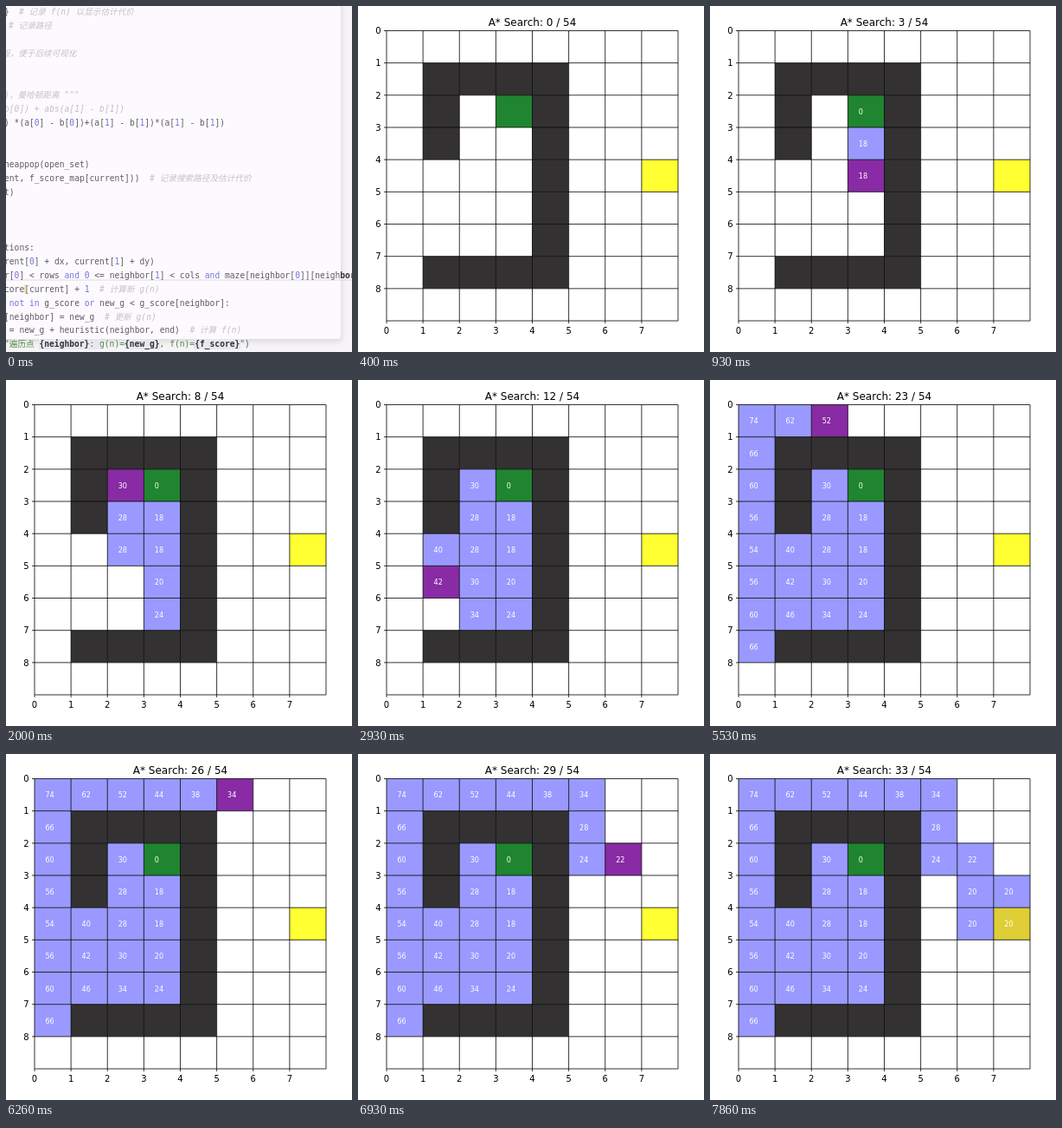
These frames come from a looping animation (400 px wide and 399 px high, 8000 ms). An HTML page:

```html
<!DOCTYPE html>
<html lang="en">
<head>
<meta charset="utf-8">
<title>A* Search</title>
<style>
  html, body { margin: 0; width: 100%; height: 100%; overflow: hidden; background: #fff; }
  svg { display: block; width: 400px; height: 399px; }
  text { white-space: pre; }
  #plot text { font-family: "DejaVu Sans", sans-serif; font-size: 10px; }
  #plot .title { font-size: 12px; text-anchor: middle; }
  #plot .cost { font-size: 8.1px; fill: #fff; }
  #code text { font: 9.63px "DejaVu Sans Mono", "Noto Sans CJK SC", "Noto Sans CJK", monospace; fill: #5d5a60; }
  #code .c { fill: #c3c0c5; font-style: italic; }
  #code .k { fill: #7474da; }
  #code .s { fill: #4d8a45; }
  #code .v { fill: #333; font-weight: bold; }
</style>
</head>
<body>
<svg viewBox="0 0 400 399">
  <g id="plot">
    <rect width="400" height="399" fill="#fff"/>
    <g id="cells"></g>
    <path id="grid" fill="none" stroke="#000" stroke-width=".8"/>
    <g id="labels"></g>
    <text id="title" class="title" x="201.5" y="22.5"></text>
  </g>
  <g id="code">
    <defs>
      <filter id="soft" x="-10%" y="-10%" width="120%" height="120%"><feGaussianBlur stdDeviation="3"/></filter>
    </defs>
    <rect width="400" height="399" fill="#f6f4f7"/>
    <rect x="-10" y="-10" width="398" height="397" rx="4" fill="#c9c5cc" opacity=".6" filter="url(#soft)"/>
    <rect x="-10" y="-10" width="397" height="394" rx="4" fill="#fdfaff"/>
    <path d="M0 316H400" stroke="#dedbe0"/>
    <path d="M38 384H108V396H38ZM137 384H178V396H137ZM217 384H271V396H217Z" fill="#e9e6f2"/>
    <path d="M22 321V332" stroke="#efe9a8" stroke-width="2"/>
  </g>
</svg>
<script>
const $ = id => document.getElementById(id);
const LOOP = 8000, FPS = 15;
const COLS = 8, ROWS = 9, X0 = 33, Y0 = 28.5, W = 42.125, H = 37.17;

function add(parent, tag, attrs, text = "") {
  const el = document.createElementNS("http://www.w3.org/2000/svg", tag);
  for (const k in attrs) el.setAttribute(k, attrs[k]);
  el.textContent = text;
  parent.append(el);
  return el;
}

// Code listing: [row, x, text]; styled runs are written «class:text»
const listing = [
  [0, -2, "}"], [0, 15, "«c:# 记录 f(n) 以显示估计代价»"],
  [1, 3, "«c:# 记录路径»"],
  [3, -5, "«c:程，便于后续可视化»"],
  [6, -2, "«c:)，曼哈顿距离 \"\"\"»"],
  [7, -2, "«c:b[0]) + abs(a[1] - b[1])»"],
  [8, -2, ") *(a[«k:0»] - b[«k:0»])+(a[«k:1»] - b[«k:1»])*(a[«k:1»] - b[«k:1»])"],
  [11, -2, "heappop(open_set)"],
  [12, -2, "ent, f_score_map[current]))  «c:# 记录搜索路径及估计代价»"],
  [13, -2, "t)"],
  [17, -2, "tions:"],
  [18, -2, "rent[«k:0»] + dx, current[«k:1»] + dy)"],
  [19, -2, "r[«k:0»] < rows «k:and» «k:0» <= neighbor[«k:1»] < cols «k:and» maze[neighbor[«k:0»]][neigh«v:bor»"],
  [20, -2, "core[current] + «k:1»  «c:# 计算新 g(n)»"],
  [21, -2, " «k:not in» g_score «k:or» new_g < g_score[neighbor]:"],
  [22, -2, "[neighbor] = new_g  «c:# 更新 g(n)»"],
  [23, -2, " = new_g + heuristic(neighbor, end)  «c:# 计算 f(n)»"],
  [24, -2, "«s:\"遍历点 »«v:{neighbor}»«s:: g(n)=»«v:{new_g}»«s:, f(n)=»«v:{f_score}»«s:\"»)"],
];
for (const [row, x, src] of listing) {
  const line = add($("code"), "text", { x, y: 10.4 + row * 15.96 });
  for (const part of src.split(/[«»]/)) {
    const m = /^([ckvs]):([^]*)$/.exec(part);
    if (part) add(line, "tspan", { class: m ? m[1] : "" }, m ? m[2] : part);
  }
}

// Maze and search; nodes are numbered row * COLS + col
const maze = ["........", ".####...", ".#..#...", ".#..#...", "....#...",
              "....#...", "....#...", ".####...", "........"];
const START = 2 * COLS + 3, END = 4 * COLS + 7;

function search() {
  const g = { [START]: 0 }, f = { [START]: 0 }, open = [START], order = [];
  while (open.length) {
    open.sort((a, b) => f[a] - f[b] || a - b);
    const cur = open.shift(), r = Math.floor(cur / COLS), c = cur % COLS;
    order.push({ id: cur, cost: f[cur] });
    if (cur === END) break;
    for (const [dr, dc] of [[-1, 0], [1, 0], [0, -1], [0, 1]]) {
      const nr = r + dr, nc = c + dc, n = nr * COLS + nc;
      if (maze[nr]?.[nc] !== "." || g[cur] + 1 >= (g[n] ?? Infinity)) continue;
      g[n] = g[cur] + 1;
      f[n] = g[n] + (nr - 4) ** 2 + (nc - 7) ** 2;
      if (!open.includes(n)) open.push(n);
    }
  }
  return order;
}

const px = c => X0 + c * W, py = r => Y0 + r * H;
const cells = [];
for (let r = 0; r < ROWS; r++) for (let c = 0; c < COLS; c++)
  cells.push(add($("cells"), "rect", { x: px(c), y: py(r), width: W, height: H }));

let grid = "";
for (let c = 0; c <= COLS; c++) {
  const x = px(c);
  grid += `M${x} ${Y0}V${py(ROWS) + (c < COLS ? 3 : 0)}`;
  if (c < COLS) add($("labels"), "text", { x, y: 378, "text-anchor": "middle" }, c);
}
for (let r = 0; r <= ROWS; r++) {
  const y = py(r);
  grid += `M${X0 - (r < ROWS ? 3 : 0)} ${y}H${px(COLS)}`;
  if (r < ROWS) add($("labels"), "text", { x: 26.7, y: y + 3.7, "text-anchor": "end" }, r);
}
$("grid").setAttribute("d", grid);

const visits = search();
for (const v of visits) {
  const r = Math.floor(v.id / COLS), c = v.id % COLS;
  v.label = add($("labels"), "text", { class: "cost", x: px(c) + 12.4, y: py(r) + H / 2 + 3.4 }, v.cost);
}

// Ticks between successive visits
let tick = 0;
const starts = [..."733443334334343434343433434434343"].map(d => tick += +d);

function fillOf(id, index, count) {
  if (id === START) return "#1f8530";
  if (id === END) return index >= 0 && index < count ? "#dfce35" : "#ffff32";
  if (maze[Math.floor(id / COLS)][id % COLS] === "#") return "#333132";
  if (index < 0 || index >= count) return "#fff";
  return index === count - 1 ? "#882ba4" : "#9999ff";
}

let shown = -1;
function show(count) {
  if (count === shown) return;
  shown = count;
  $("title").textContent = `A* Search: ${count} / 54`;
  cells.forEach((el, id) =>
    el.setAttribute("fill", fillOf(id, visits.findIndex(v => v.id === id), count)));
  visits.forEach((v, i) => v.label.setAttribute("visibility", i < count ? "visible" : "hidden"));
}

function draw() {
  const now = Math.floor((performance.now() % LOOP + 7) * FPS / 1000);
  $("code").setAttribute("visibility", now < 1 ? "visible" : "hidden");
  show(starts.filter(s => s <= now).length);
  requestAnimationFrame(draw);
}
draw();
</script>
</body>
</html>
```
